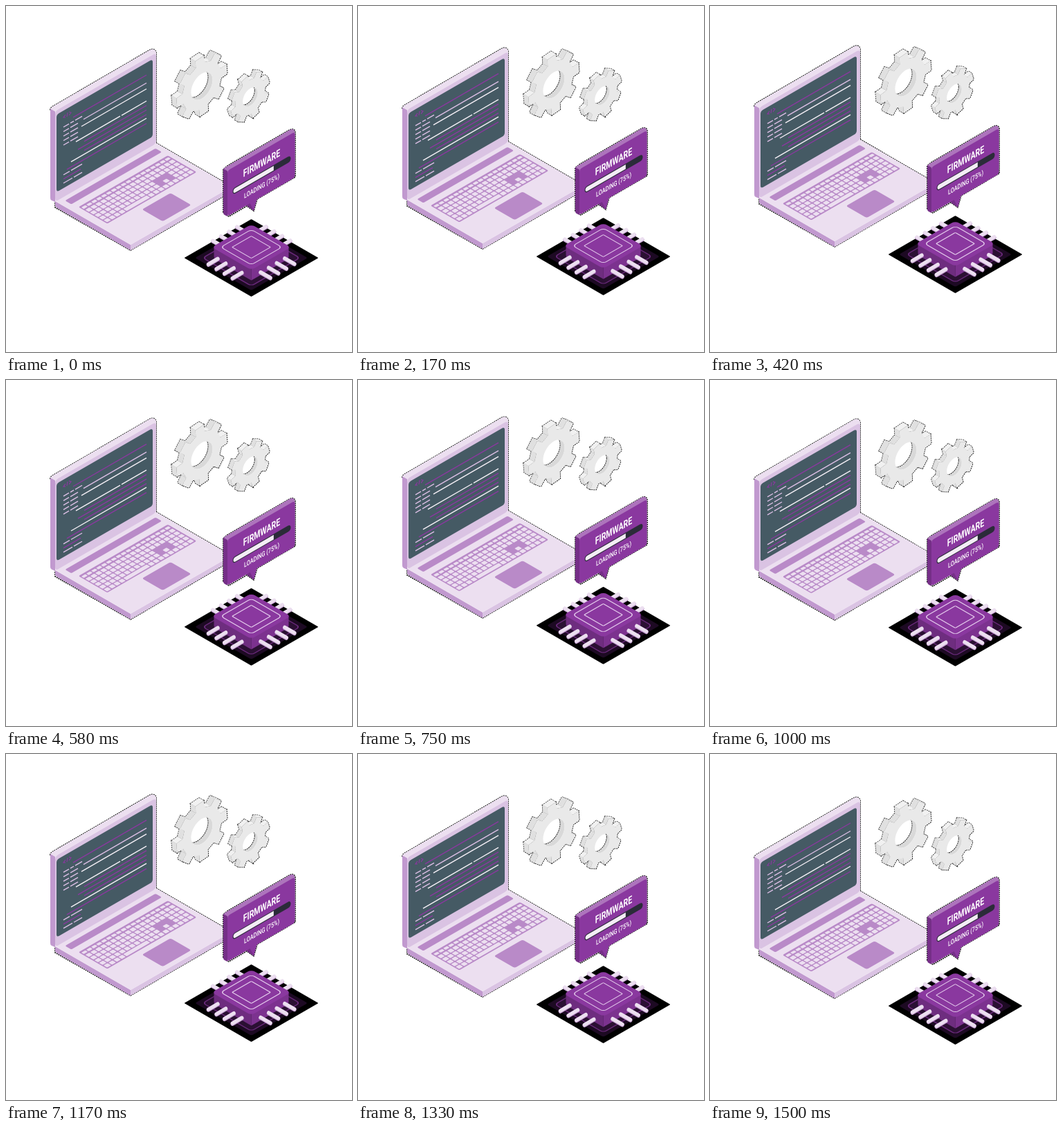
Animation of 500x500 px, one loop 1540 ms. Source, as an HTML page:

```html
<!DOCTYPE html>
<html lang="en">
<head>
<meta charset="utf-8">
<title>Firmware update</title>
<style>
  html, body { margin: 0; width: 100%; height: 100%; overflow: hidden; background: #fff; }
  svg { display: block; width: 100vw; height: 100vh; }
  text { font-family: Roboto, sans-serif; fill: #fff; text-anchor: middle; }
</style>
</head>
<body>
<svg viewBox="0 0 500 500"><g id="scene"></g></svg>
<script>
const SLOPE = 0.577;
const LILAC = '#ecdff0', MID = '#dac3e3', DEEP = '#b98ac8', PURPLE = '#8a389f';
const scene = document.getElementById('scene');

const wall = (x, y) => `transform="matrix(.866 -.5 0 1 ${x} ${y})"`;
const floor = (x, y) => `transform="matrix(.866 -.5 .866 .5 ${x} ${y})"`;
const poly = (points, fill, extra = '') => `<polygon points="${points}" fill="${fill}" ${extra}/>`;
const path = (d, fill, extra = '') => `<path d="${d}" fill="${fill}" ${extra}/>`;
const rect = (x, y, w, h, r, fill, extra = '') =>
  `<rect x="${x}" y="${y}" width="${w}" height="${h}" rx="${r}" fill="${fill}" ${extra}/>`;
const line = (x1, y1, x2, y2, color, width, extra = '') =>
  `<path d="M${x1} ${y1}L${x2} ${y2}" stroke="${color}" stroke-width="${width}" ${extra}/>`;
// Dark dotted edge; drawn beneath a shape so only its outer half shows.
const rim = d => path(d, 'none', 'stroke="#1a1a1a" stroke-width="1.8" stroke-dasharray="2 1"');
const round = 'stroke-linecap="round"';

function gear(cx, cy, radius, hole, turn, dx, dy) {
  const project = (r, deg) => {
    const a = deg * Math.PI / 180, u = r * Math.cos(a), v = r * Math.sin(a);
    return [cx + .866 * u, cy + v - .5 * u];
  };
  const points = [];
  for (let k = 0; k < 8; k++) {
    const a = turn + k * 45;
    points.push(project(radius * .77, a - 13), project(radius, a - 9.5),
                project(radius, a + 9.5), project(radius * .77, a + 13));
  }
  let sides = '', edge = '';
  points.forEach(([x, y], i) => {
    const [x2, y2] = points[(i + 1) % points.length];
    if ((x2 - x) * dy - (y2 - y) * dx > 0) return;
    const fill = Math.abs(x2 - x) > Math.abs(y2 - y) ? '#f1f1f1' : '#e0e0e0';
    const quad = [[x, y], [x2, y2], [x2 + dx, y2 + dy], [x + dx, y + dy]];
    sides += poly(quad.join(' '), fill, `stroke="${fill}" stroke-width=".4"`);
    edge += `M${quad.join('L')}Z`;
  });
  const ring = [], count = 40;
  for (let i = 0; i < count; i++) ring.push(project(hole, i * 360 / count));
  const back = ring.map(([x, y]) => [x + dx, y + dy]);
  const outline = `M${points.join('L')}Z`, bore = `M${ring.join('L')}Z`;
  return rim(edge + outline) + sides + poly(ring.join(' '), '#d9d9d9') +
    rim(`M${back.join('L')}Z`) + poly(back.join(' '), '#fff') +
    path(outline + bore, '#e9e9e9', 'fill-rule="evenodd"');
}

function laptop() {
  let keys = '';
  for (let row = 0; row < 6; row++) {
    for (let col = 0; col < 18; col++) {
      const arrows = col > 11 && col < 15;
      if (arrows && (row === 3 || row === 4 && col !== 13)) continue;
      if (row === 5 && col > 3 && col < 9) continue;
      const h = row ? 6 : 4.2;
      keys += rect(12.8 + col * 8.15, 30 + row * 7.6 + (6 - h) / 2, 6.6, h, 1, LILAC);
    }
  }
  keys += rect(45.4, 68, 39.2, 6, 1, LILAC);

  // Each code line: colour, start x, end x, height at x = 83.
  const white = '#f5f0f7', pale = '#dcbfe5';
  const code = [
    [PURPLE, 97, 203, 169], [pale, 112, 203, 180.5], [white, 109, 203, 189],
    [white, 101, 165, 206.5], [white, 167, 203, 206.5], [PURPLE, 113, 203, 213],
    [PURPLE, 104, 203, 219.5], [PURPLE, 113, 203, 226], [white, 94, 203, 231.5],
    [PURPLE, 88, 203, 239],
    [pale, 83, 92, 244], [pale, 94, 110, 244], [PURPLE, 83, 108, 250],
    [pale, 83, 96, 256], [pale, 98, 110, 256], [pale, 100, 110, 175]
  ];
  for (let i = 0; i < 5; i++) {
    code.push([pale, 83, 91, 175 + i * 6.5], [pale, 93, i ? 104 : 98, 175 + i * 6.5]);
  }
  const text = code.map(([color, x1, x2, y]) =>
    line(x1, y - (x1 - 83) * SLOPE, x2, y - (x2 - 83) * SLOPE, color, 1.4)).join('');

  return rim('M217 198L326 261V268L180 353L71 291V282') +
    poly('71,282 180,345 180,353 74,292 71,289', '#c199cf') +
    poly('180,345 326,261 326,268 182,352 180,353', MID) +
    poly('71,282 217,198 326,261 180,345', LILAC) +
    `<g ${floor(71, 282)}>` +
      rect(9, 7.5, 151, 10.5, 2, DEEP) + rect(11, 28, 149, 48, 2, DEEP) + keys +
      rect(60.5, 84.5, 47.5, 34.5, 3, DEEP) + '</g>' +
    rim('M64 150.5Q64 147.5 67 145.5L208 63.5Q214 60.5 217 66.5V198') +
    path('M64 150.5Q64 147.5 67 145.5L208 63.5Q214 60.5 217 66.5V198L71 283L64 279Z', LILAC) +
    path('M64 148.5L71 152.5V283L66 281Q64 280 64 277Z', '#c199cf') +
    rect(0, 0, 168.6, 131, 5, MID, wall(71, 152)) +
    rect(0, 0, 160.5, 112, 4, '#455a64', wall(73, 157)) +
    path('M86 157L83 161L86 161M88 160L89 154M91 153L94 154L91 158', 'none',
      `stroke="${PURPLE}" stroke-width="1.2"`) + text;
}

function card() {
  const label = (y, size, weight, scale, value) =>
    `<text transform="matrix(${scale} ${-scale * SLOPE} 0 1 369.5 ${y})" font-size="${size}" font-weight="${weight}">${value}</text>`;
  return rim('M314 298V236L320 231L410 179Q417 176 418 183V247L363 279L358 296L348 289L322 304Z') +
    poly('348,285 348,289 358,296 363,276', '#752f87') +
    path('M314 237Q314 235 317 233L410 179Q416 176 417.5 182V240L320 303L314 299Z', '#ad74bc') +
    path('M314 235L320 238.5V304L316 302Q314 301 314 298Z', '#752f87') +
    rect(0, 0, 112.5, 66, 4, PURPLE, wall(320, 238)) +
    poly('352,284 358,295.5 363,278', PURPLE) +
    `<g ${wall(327.5, 264)}>` + rect(0, 0, 97, 9, 4.5, '#2b2b39') +
      path('M5 1.2H68.5V7.8H5Q1.2 7.8 1.2 4.5Q1.2 1.2 5 1.2Z', '#f4edf6') + '</g>' +
    label(232, 15, 600, .7, 'FIRMWARE') + label(263.5, 10, 500, .73, 'LOADING (75%)');
}

function chip() {
  const tile = (y, side, r, fill, extra) =>
    rect(-side / 2, -side / 2, side, side, r, fill, `${floor(354.5, y)} ${extra || ''}`);
  const outline = (color, width) => `stroke="${color}" stroke-width="${width}"`;
  const pin = (x1, y1, x2, y2) =>
    line(x1, y1 + 1, x2, y2 + 1, '#c9a5d5', 5.6, round) + line(x1, y1, x2, y2, LILAC, 5, round);
  let rear = '', front = '';
  for (let i = 0; i < 4; i++) {
    const x = i * 11.6, y = i * 6.7;
    rear += pin(299 + x, 339 - y, 312 + x, 346.5 - y) + pin(376 + x, 318.5 + y, 363 + x, 326 + y);
    front += pin(292.5 + x, 373 + y, 306 + x, 365 + y) + pin(368 + x, 384.5 - y, 382 + x, 392.5 - y);
  }
  return tile(364, 112, 1, '#000') + tile(364, 94, 3, '#1d0a23') +
    tile(364, 81, 5, '#2b1033', outline('#69297a', 1.6)) + rear +
    path('M300.5 348V362Q300.5 365 303 366.5L350 394Q354.5 396.5 354.5 396.5V360Z', '#6e2d7f') +
    path('M408.5 348V362Q408.5 365 406 366.5L359 394Q354.5 396.5 354.5 396.5V360Z', '#7c328f') +
    tile(348.5, 66, 6, PURPLE) +
    tile(348.5, 51, 5, 'none', outline('#e3c9eb', 1.3)) +
    tile(348.5, 32, 1, 'none', outline('#e3c9eb', 1.3)) + front;
}

scene.innerHTML = laptop() + gear(283, 115.7, 42.5, 18, -5, -7, -4) +
  gear(353, 131.5, 32.6, 12.5, -17, -5, -3) + chip() + card();

// Linear rise and fall in 36 equal steps.
function draw(now) {
  const step = Math.min(36, Math.floor((now % 1540 + 5) * 37 / 1540));
  const lift = 9.2 * (1 - Math.abs(1 - step / 18));
  scene.setAttribute('transform', `translate(0 ${-lift})`);
  requestAnimationFrame(draw);
}
draw(performance.now());
</script>
</body>
</html>
```
